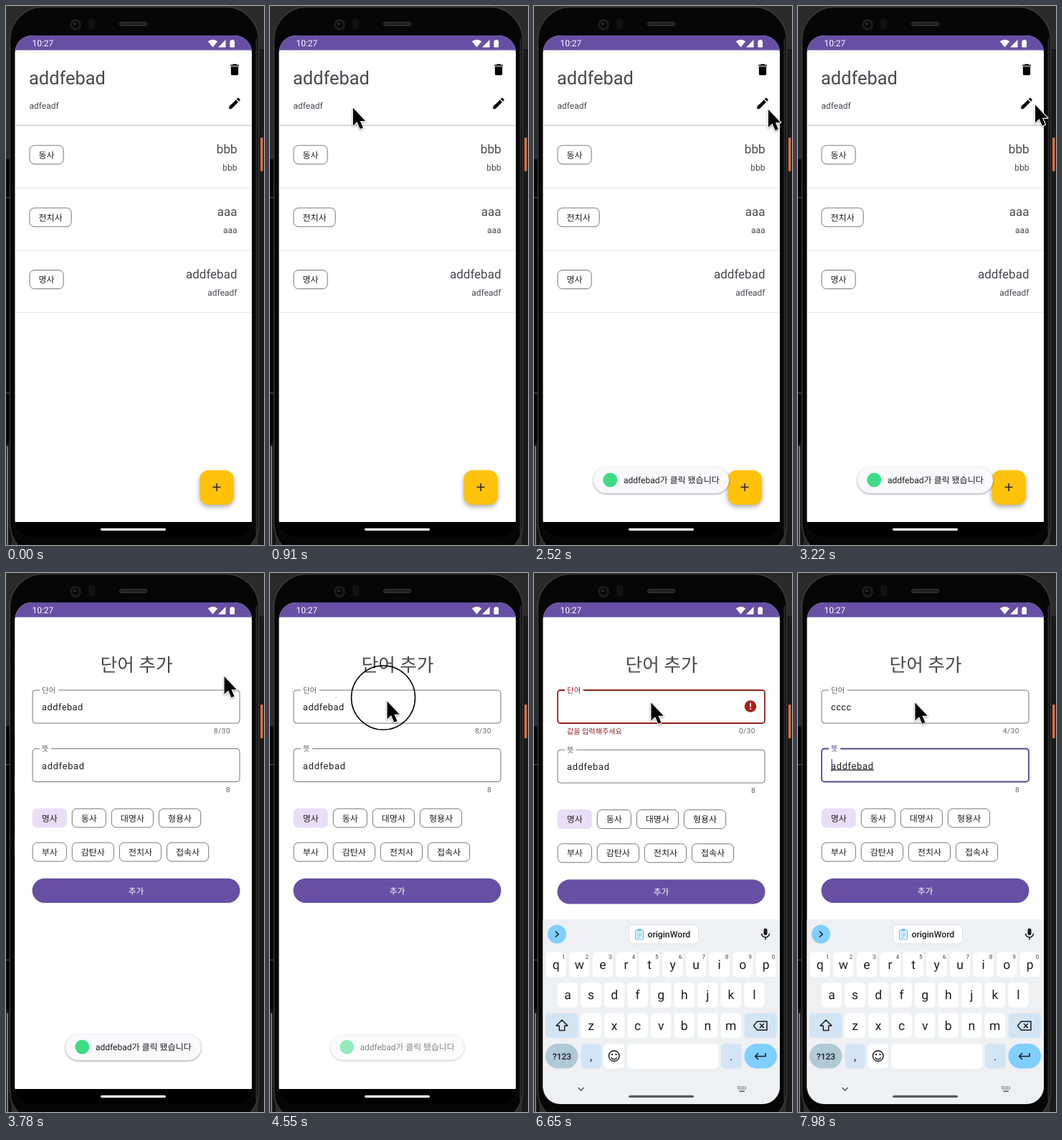
Animation, 360 px wide and 750 px high, one loop 8000 ms. Source, as an HTML page:

```html
<!DOCTYPE html>
<html lang="ko">
<head>
<meta charset="utf-8">
<title>단어 추가</title>
<style>
  html, body { margin: 0; width: 100%; height: 100%; overflow: hidden; background: #000; }
  svg { display: block; font-family: Roboto, 'Noto Sans CJK KR', 'Noto Sans CJK', sans-serif; }
  text { white-space: pre; text-rendering: geometricPrecision; }
  .fab { filter: drop-shadow(0 3px 3px #0005); }
  .toast { filter: drop-shadow(0 1.5px 1.5px #0006); }
  #pointer path { filter: drop-shadow(0 1px 1px #0006); }
</style>
</head>
<body>
<svg id="stage" width="360" height="750" viewBox="0 0 360 750"></svg>
<script>
const LOOP = 8000;
const PURPLE = '#6750a4', FOCUS_PURPLE = '#56458a', GRAY = '#79747e';
const RED = '#ab2018', DARK_RED = '#94201b', INK = '#1d1b20', SOFT = '#49454f';
const $ = id => document.getElementById(id);

// Markup helpers
const text = (x, y, size, str, fill = INK, more = '') =>
  `<text x="${x}" y="${y}" font-size="${size}" fill="${fill}" ${more}>${str}</text>`;
const MID = 'text-anchor="middle"', END = 'text-anchor="end"';
const rect = (x, y, w, h, r, fill, more = '') =>
  `<rect x="${x}" y="${y}" width="${w}" height="${h}" rx="${r}" fill="${fill}" ${more}/>`;
const circle = (x, y, r, fill, more = '') =>
  `<circle cx="${x}" cy="${y}" r="${r}" fill="${fill}" ${more}/>`;
const line = (d, color, width = 1.5, more = '') =>
  `<path d="${d}" fill="none" stroke="${color}" stroke-width="${width}" ${more}/>`;
const shape = (d, fill, more = '') => `<path d="${d}" fill="${fill}" ${more}/>`;
const group = (id, body, more = '') => `<g id="${id}" ${more}>${body}</g>`;

const chipWidth = label => 26.1 + 11.04 * label.length;
function chip(x, y, label, selected) {
  const w = chipWidth(label);
  const skin = selected ? rect(x, y, w, 27, 6.5, '#e8def8')
    : rect(x + .5, y + .5, w - 1, 26, 6.5, '#fff', `stroke="${GRAY}"`);
  return skin + text(x + w / 2, y + 18, 12, label, INK, MID);
}
function chipRow(y, labels, selected) {
  let x = 32.6;
  return labels.map(label => {
    const out = chip(x, y, label, label === selected);
    x += chipWidth(label) + 6.9;
    return out;
  }).join('');
}

function phone() {
  return rect(0, 0, 360, 750, 0, '#2b2b2b')
    + rect(0, 213, 8, 395, 0, '#050505') + rect(0, 266, 6, 1, 0, '#555') + rect(0, 538, 6, 1, 0, '#555')
    + rect(0, 608, 8, 142, 0, '#151515') + rect(1, 612, 2, 138, 1, '#777')
    + rect(352, 60, 8, 690, 0, '#191919') + rect(355, 183, 3.5, 47, 1, '#d9704a')
    + rect(5.5, 1.5, 347, 765, 46, '#060606', 'stroke="#3a3a3a" stroke-width="1.5"')
    + rect(348.5, 45, 2, 690, 1, '#2c2c2c')
    + circle(97, 26, 8, '#1c1c1c') + circle(97, 26, 4.5, '#050505') + circle(96, 25, 1.8, '#33363c')
    + rect(115, 17, 9, 15, 3, '#121212')
    + rect(158.5, 22.5, 38, 5, 2.5, '#222', 'stroke="#383838"');
}

function statusBar() {
  return rect(12, 41, 332, 20.5, 0, PURPLE) + text(36.4, 56.3, 12, '10:27', '#fff')
    + shape('M288.5 57.5 281.8 49.3Q288.5 44 295.2 49.3Z', '#fff')
    + shape('M306.5 47V57.5H296Z', '#fff')
    + shape('M314 47h3.5v1.2h1.5v9.3h-6.6v-9.3h1.6Z', '#fff');
}

function listScreen() {
  const row = (y, kind, word, meaning) => chip(32.5, y, kind)
    + text(322.5, y + 11.5, 17, word, SOFT, END) + text(322.5, y + 35.5, 12, meaning, SOFT, END)
    + rect(12, y + 59, 332, 1, 0, '#e7e6e8');
  return rect(12, 41, 332, 677, 0, '#fff')
    + text(32, 109, 25.4, 'addfebad', SOFT) + text(32.5, 142.5, 12, 'adfeadf', SOFT)
    + shape('M6 19c0 1.1.9 2 2 2h8c1.1 0 2-.9 2-2V7H6v12zM19 4h-3.5l-1-1h-5l-1 1H5v2h14V4z',
        '#000', 'transform="translate(308.7 78.2) scale(.86)"')
    + shape('M3 17.25V21h3.75L17.81 9.94l-3.75-3.75L3 17.25zM20.71 7.04c.39-.39.39-1.02 0-1.41l-2.34-2.34c-.39-.39-1.02-.39-1.41 0l-1.83 1.83 3.75 3.75 1.83-1.83z',
        '#000', 'transform="translate(308.7 125.2) scale(.86)"')
    + rect(12, 165.5, 332, 1.3, 0, '#cac8cc')
    + row(193.5, '동사', 'bbb', 'bbb') + row(280.5, '전치사', 'aaa', 'aaa')
    + row(367, '명사', 'addfebad', 'adfeadf')
    + rect(270, 646, 48, 48, 13, '#fec20b', 'class="fab"')
    + line('M288.5 669.5h11M294 664v11', '#2e2300', 1.6);
}

function formScreen() {
  return rect(-30, 41, 374, 677, 0, '#fff')
    + text(178, 136.5, 25.7, '단어 추가', SOFT, MID) + group('word', '')
    + group('lower', group('meaning', '')
      + chipRow(327.5, ['명사', '동사', '대명사', '형용사'], '명사')
      + chipRow(374.7, ['부사', '감탄사', '전치사', '접속사'])
      + rect(32.5, 425, 290, 34, 17, PURPLE) + text(177.5, 446.7, 11.8, '추가', '#fff', MID));
}

function keyboard() {
  const BLUE = '#d3e5f5', SKY = '#7fcfff';
  const key = (x, y, w, fill = '#fff', r = 5) => rect(x, y, w, 34.5, r, fill);
  const letters = (str, x0, y, digits) => [...str].map((c, i) => {
    const x = x0 + 32.55 * i;
    return key(x - 14.2, y, 28.4) + text(x, y + 23, 17.5, c, INK, MID)
      + (digits ? text(x + 10.5, y + 9.5, 8.5, (i + 1) % 10, SOFT, MID) : '');
  }).join('');
  const round = 'stroke-linecap="round" stroke-linejoin="round"';
  let dots = '';
  for (let i = 0; i < 10; i++) dots += rect(284 + 2.6 * (i % 5), 714.5 + 2.6 * (i / 5 | 0), 1.4, 1.4, 0, SOFT);
  return rect(12, 482, 332, 270, 0, '#eff0f4')
    + circle(32, 502.5, 13, SKY) + line('M30 498.5l4 4-4 4', INK, 1.6)
    + group('clip', rect(132.5, 489.5, 97, 26.5, 6.5, '#fff', 'stroke="#dcdde2"')
      + rect(141.5, 497, 11, 13, 1.5, '#e2f4ff', 'stroke="#6fbfe6" stroke-width="1.2"')
      + rect(144.5, 495, 5, 3.5, 1, '#6fbfe6') + line('M144 502h6M144 504.5h6M144 507h4', '#6fbfe6', 1)
      + text(158.5, 507.2, 12.2, 'originWord', INK, 'font-weight="500"'))
    + rect(320.5, 494.5, 5, 9.5, 2.5, INK)
    + line('M317.5 501.5a5.5 5.5 0 0 0 11 0M323 507v3.5', INK, 1.5)
    + letters('qwertyuiop', 30.8, 527.5, true) + letters('asdfghjkl', 47, 570)
    + key(16, 612.5, 46, BLUE) + letters('zxcvbnm', 79.5, 612.5) + key(293.5, 612.5, 45.5, BLUE)
    + line('M39 622l8 8h-4.3v6.5h-7.4v-6.5H31Z', INK, 1.5, round)
    + line('M311.5 624h13.5v12h-13.5l-5-6ZM315 627l6 6M321 627l-6 6', INK, 1.5)
    + key(16, 655, 45.5, '#b0c9d6', 17.3) + text(39, 677, 12, '?123', INK, MID + ' font-weight="500"')
    + key(65.5, 655, 28.5, BLUE) + text(79.7, 678, 16, ',', INK, MID)
    + key(97.5, 655, 28.5) + circle(111.7, 672, 7.3, 'none', `stroke="${INK}" stroke-width="1.5"`)
    + circle(109, 670, 1.2, INK) + circle(114.5, 670, 1.2, INK) + line('M107.8 674a4.2 4.2 0 0 0 7.8 0', INK, 1.4)
    + key(130, 655, 127.5) + key(260.8, 655, 28.5, BLUE) + text(275, 678, 16, '.', INK, MID)
    + key(293.5, 655, 45.5, SKY, 17.3) + line('M323 668v4.5h-14M313 668l-4.3 4.5 4.3 4.5', INK, 1.6)
    + line('M61.5 716l4 4 4-4', SOFT, 1.3) + dots + rect(286.5, 720.5, 7.5, 1.4, 0, SOFT);
}

const toast = rect(83, 642, 189, 36, 18, '#f8f8fd', 'class="toast"') + circle(106.3, 659.5, 10, '#3ddc84')
  + text(125, 664.2, 12, 'addfebad가 클릭 됐습니다');
const handle = (fill, more) => rect(132, 726.7, 91, 3.2, 1.6, fill, more);

$('stage').innerHTML = phone()
  + `<clipPath id="screen">${rect(12.5, 41, 330.5, 698, 24, '#000')}</clipPath>`
  + `<g clip-path="url(#screen)">${rect(12, 41, 332, 698, 0, '#000')}`
  + group('list', listScreen()) + group('form', formScreen()) + statusBar()
  + group('toast', toast) + handle('#fff') + group('keys', keyboard())
  + handle('#5a5a5a', 'id="darkHandle"') + '</g>'
  + group('pointer', circle(-5.5, -4.5, 44.5, 'none', 'id="ring" stroke="#000" stroke-width="1.5"')
    + shape('M0 0V26.5L6 21 10.5 31.5 15 29.5 10.7 19.7H18.5Z', '#000',
        'transform="translate(0 .5) scale(.93)" stroke="#fff" stroke-width="2.5" paint-order="stroke" stroke-linejoin="round"'));

// Timeline
const clamp = v => Math.min(1, Math.max(0, v));
const ramp = (t, start, length) => clamp((t - start) / length);
const easeOut = p => 1 - (1 - p) ** 3;
const smooth = p => p * p * (3 - 2 * p);
const within = (t, a, b) => t >= a && t < b;

const path = [[280, 327, 622], [1050, 96, 96], [1610, 144, 386], [1750, 145, 388], [2030, 145, 388],
  [2600, 337, 130], [3220, 331, 137], [3570, 331, 137], [4410, 163.5, 178], [4620, 163.5, 178], [5110, 163.5, 180]];
const clicks = [[1890, 2030], [3360, 3500], [4480, 4620]];
const erasures = [5530, 5740, 5880, 6020, 6160, 6300, 6510, 6650];
const keystrokes = [7140, 7350, 7490, 7630];
const FOCUS = 4620, ERROR = 6510, VALID = 7350, NEXT = 7980;

function pointerAt(t) {
  const i = path.findIndex(p => p[0] > t);
  if (i < 0) return path.at(-1).slice(1);
  const [a, b] = [path[Math.max(0, i - 1)], path[i]];
  const p = smooth(ramp(t, a[0], b[0] - a[0]));
  return [a[1] + (b[1] - a[1]) * p, a[2] + (b[2] - a[2]) * p];
}

function wordAt(t) {
  const past = times => times.filter(time => t >= time).length;
  return 'addfebad'.slice(0, 8 - past(erasures)) + 'c'.repeat(past(keystrokes));
}

function drawField(id, y, { label, value, spacing, counter, focus, error, caret }) {
  const color = error ? DARK_RED : focus ? FOCUS_PURPLE : GRAY;
  const thick = focus || error ? 1.8 : 1;
  $(id).innerHTML = rect(33, y, 289, 46, 4, '#fff', `stroke="${color}" stroke-width="${thick}"`)
    + rect(43, y - 3, 6.5 + 9.6 * label.length, 6, 0, '#fff')
    + text(46, y + 3.8, 10.5, label, error || focus ? color : '#625e68')
    + text(46, y + 28, 12.85, value, INK,
        `id="${id}Text" letter-spacing="${spacing}" ${focus ? 'text-decoration="underline"' : ''}`)
    + text(309, y + 60, 10, counter, '#625e68', END + ' letter-spacing=".5"');
  if (caret) {
    const x = 46.5 + (caret === 'end' ? $(id + 'Text').getComputedTextLength() : 0);
    $(id).innerHTML += rect(x, y + 14.5, 1.3, 17, 0, FOCUS_PURPLE);
  }
}

function drawForm(t) {
  const value = wordAt(t), error = within(t, ERROR, VALID), focus = within(t, FOCUS, NEXT);
  drawField('word', 163, {
    label: '단어', value, spacing: .45, counter: value.length + '/30',
    focus, error, caret: focus && !error && 'end'
  });
  if (error) {
    $('word').innerHTML += circle(302, 185.5, 8.3, RED) + rect(301.1, 180.8, 1.8, 5.6, 0, '#fff')
      + rect(301.1, 188, 1.8, 1.8, 0, '#fff')
      + text(46, 224, 10.1, '값을 입력해주세요', DARK_RED, `opacity="${ramp(t, ERROR - 70, 210)}"`);
  }
  const next = t >= NEXT;
  drawField('meaning', 244.5, {
    label: '뜻', value: 'addfebad', spacing: .7, counter: '8', focus: next, caret: next && 'start'
  });
  $('lower').setAttribute('transform', `translate(0 ${error ? 1.6 : 0})`);
}

function draw(t) {
  const open = easeOut(ramp(t, 3570, 420));
  $('list').setAttribute('transform', `translate(${-33 * open} 0)`);
  $('list').style.display = t < 3990 ? '' : 'none';
  $('form').setAttribute('transform', `translate(${33 * (1 - open)} 0)`);
  $('form').style.opacity = ramp(t, 3600, 90);
  drawForm(t);

  const shown = ramp(t, 2030, 210) * (1 - ramp(t, 4450, 220));
  const scale = .97 + .03 * shown;
  $('toast').style.opacity = shown;
  $('toast').setAttribute('transform', `translate(177.5 660) scale(${scale}) translate(-177.5 -660)`);

  const rise = easeOut(ramp(t, 4620, 470));
  $('keys').style.display = t < FOCUS ? 'none' : '';
  $('keys').setAttribute('transform', `translate(0 ${262 * (1 - rise)})`);
  const grow = .96 + .04 * ramp(t, 4970, 140);
  $('clip').setAttribute('transform', `translate(181 502.5) scale(${grow}) translate(-181 -502.5)`);
  $('darkHandle').style.opacity = ramp(t, 5180, 350);

  $('pointer').setAttribute('transform', `translate(${pointerAt(t)})`);
  $('pointer').style.display = t < path[0][0] ? 'none' : '';
  $('ring').style.display = clicks.some(([a, b]) => within(t, a, b)) ? '' : 'none';
}

const start = performance.now();
function tick() {
  draw((performance.now() - start) % LOOP);
  requestAnimationFrame(tick);
}
tick();
</script>
</body>
</html>
```
